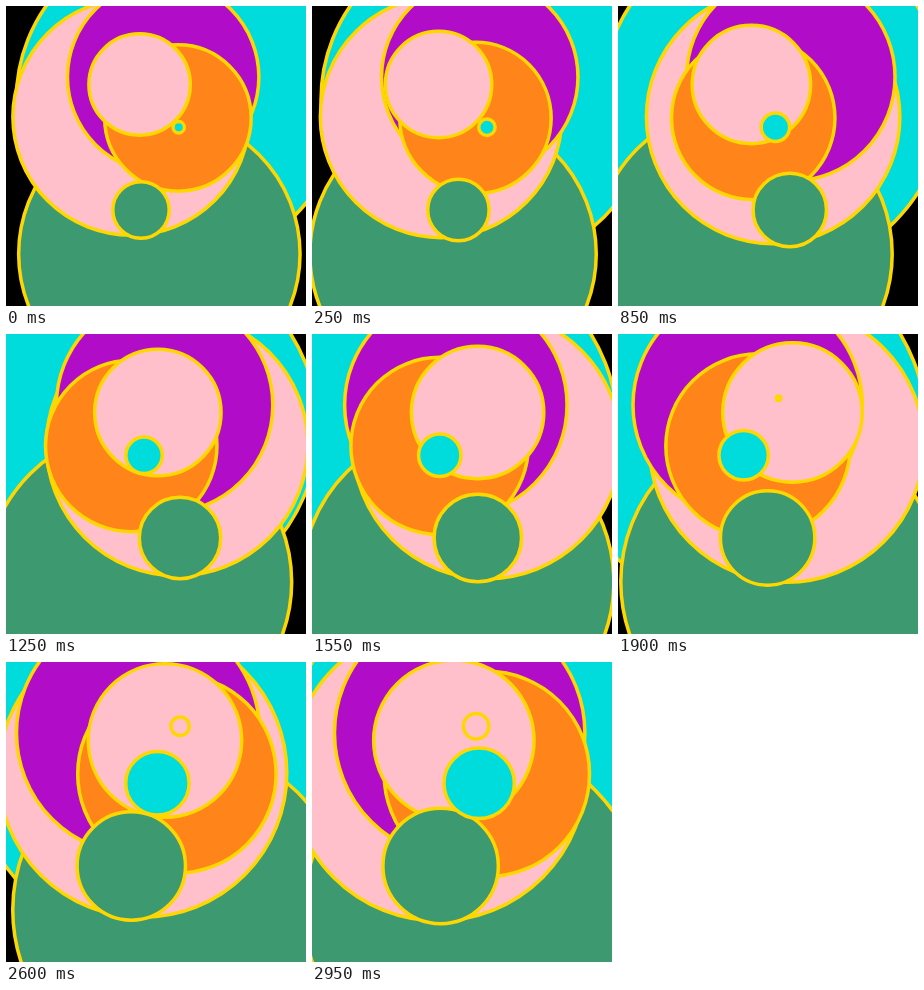
An HTML page with a canvas for the animation above (3000 ms loop, 300x300 px).

```html
<!DOCTYPE html>
<html>
<head>
<meta charset="utf-8">
<style>
html, body { margin: 0; width: 100%; height: 100%; overflow: hidden; background: #000; }
canvas { display: block; width: 100vw; height: 100vh; }
</style>
</head>
<body>
<canvas id="stage" width="300" height="300"></canvas>
<script>
const ctx = document.getElementById('stage').getContext('2d');
const LOOP = 3000, STEP = 50;
const BIRTH_GAP = 45;    // steps between two new circles
const FIRST_AGE = 326.4; // age of the oldest circle when the loop starts

const cyan = '#00dcdc', green = '#3d9970', pink = '#ffc0cb';
const orange = '#ff851b', purple = '#b10dc9', gold = '#ffd700';

// Oldest first: [fill, centre y]
const circles = [
  [cyan, 94], [green, 248], [pink, 111], [purple, 71], [orange, 112],
  [pink, 78.5], [green, 204], [cyan, 121.3], [pink, 64.3]
];

function drawCircle(fill, y, age) {
  if (age <= 0) return;
  const x = 150 + 25 * Math.sin(age / 10);
  ctx.beginPath();
  ctx.arc(x, y, age / 2, 0, Math.PI * 2);
  ctx.fillStyle = fill;
  ctx.fill();
  ctx.stroke();
}

function render(ms) {
  const step = Math.floor((ms % LOOP) / STEP);
  ctx.fillStyle = '#000';
  ctx.fillRect(0, 0, 300, 300);
  ctx.strokeStyle = gold;
  ctx.lineWidth = 3.5;
  circles.forEach(([fill, y], i) => drawCircle(fill, y, FIRST_AGE - BIRTH_GAP * i + step));
}

function tick() {
  render(performance.now());
  requestAnimationFrame(tick);
}
tick();
</script>
</body>
</html>
```
